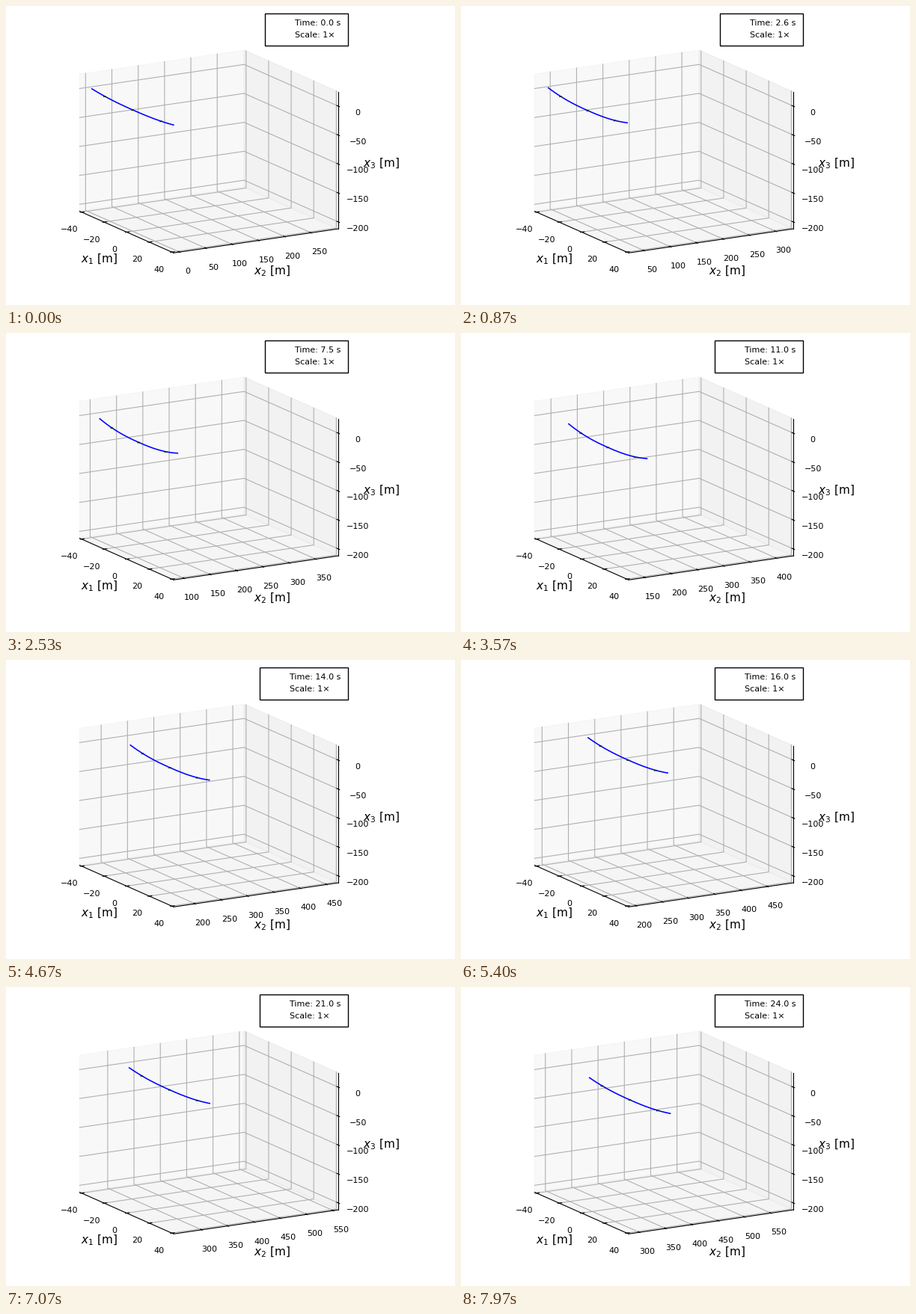
These frames come from a looping animation (600 by 400 pixels, 8 s). A matplotlib script:

```python
import numpy as np
import matplotlib.pyplot as plt
from matplotlib.animation import FuncAnimation
from matplotlib.patches import Polygon, Rectangle

W, H, DPI = 600, 400, 100
FRAMES, LOOP = 240, 8000
SPAN, SPEED, START = 300, 12.17, -5    # sliding x2 window

# Orthographic view: screen origin and one screen vector per box edge
ORIGIN = np.array([98.4, 274.6])
E1, E2, E3 = np.array([[125.6, 55.7], [219.9, -32.2], [0, -183.4]])

# Flight states: time, forward offset and rate, height and rate,
# half span, tip rise
KEYS = np.array([
    [0.0, 5.3, 0, -2.5, 0, 36.2, 5.2],
    [5.2, 8.4, 2.2, -7.4, -2, 34.2, 11.6],
    [7.6, 17.2, 6, -13.8, -4.2, 34.5, 11.0],
    [10.7, 43.5, 11, -25.7, -3, 34.7, 10.6],
    [14.0, 75.9, 7, -18.3, 8, 35.0, 8.7],
    [18.5, 78.3, -1, -1.9, 0, 35.5, 7.4],
    [23.9, 85.3, 9, -28.6, -8, 35.8, 7.4],
])
T = KEYS[:, 0]


def hermite(t, y, m):
    k = int(np.clip(np.searchsorted(T, t, side="right") - 1, 0, len(T) - 2))
    d = T[k + 1] - T[k]
    s = (t - T[k]) / d
    return ((2*s**3 - 3*s**2 + 1) * y[k] + (s**3 - 2*s**2 + s) * d * m[k]
            + (3*s**2 - 2*s**3) * y[k + 1] + (s**3 - s**2) * d * m[k + 1])


def box(u, v, w):
    """Screen points for box coordinates in 0..1."""
    u, v, w = np.broadcast_arrays(u, v, w)
    return ORIGIN + u[..., None] * E1 + v[..., None] * E2 + w[..., None] * E3


def f1(x):
    return (np.asarray(x) + 40 * 25 / 24) / (80 * 25 / 24)


def f2(d):
    return (np.asarray(d) + SPAN / 48) / (SPAN * 25 / 24)


def f3(z):
    return (np.asarray(z) + 212) / 236.8


fig = plt.figure(figsize=(W / DPI, H / DPI), dpi=DPI, facecolor="white")
ax = fig.add_axes([0, 0, 1, 1])
ax.set_xlim(0, W)
ax.set_ylim(H, 0)
ax.axis("off")


def line(pts=((0, 0), (0, 0)), color="black", lw=0.8, z=3, **kw):
    pts = np.asarray(pts)
    return ax.plot(pts[:, 0], pts[:, 1], color=color, lw=lw, zorder=z, **kw)[0]


def grid(pts=((0, 0), (0, 0))):
    return line(pts, "#b0b0b0", z=2, solid_joinstyle="round")


def label(x, y, s, size=8, ha="center"):
    return ax.text(x, y, s, fontsize=size, family="DejaVu Sans", ha=ha,
                   va="baseline", zorder=6)


def tick_ends(p, edge, inner, outer):
    d = edge / np.hypot(*edge)
    return np.array([p - inner * d, p + outer * d])


def number(v):
    return str(v).replace("-", "\u2212")


# Panes
for corners, tone in (
    (box(0, np.array([0, 1, 1, 0]), np.array([0, 0, 1, 1])), 0.95),
    (box(np.array([0, 1, 1, 0]), 1, np.array([0, 0, 1, 1])), 0.90),
    (box(np.array([0, 1, 1, 0]), np.array([0, 0, 1, 1]), 0), 0.925),
):
    ax.add_patch(Polygon(corners, fc=(tone,) * 3, ec=(tone,) * 3, alpha=0.5,
                         lw=1, zorder=1))

# Axis lines
line(box(np.array([0, 1]), 0, 0))
line(box(1, np.array([0, 1]), 0))
line(box(1, 1, np.array([0, 1])))

# Fixed x1 and x3 ticks
for v in range(-40, 41, 20):
    u = f1(v)
    grid(box(u, np.array([0, 1, 1]), np.array([0, 0, 1])))
    p = box(u, 0, 0)
    line(tick_ends(p, E2, 1.8, 3.6))
    label(p[0] - 16.5, p[1] + 26.5, number(v))

for v in range(-200, 1, 50):
    w = f3(v)
    grid(box(np.array([0, 0, 1]), np.array([0, 1, 1]), w))
    p = box(1, 1, w)
    line(tick_ends(p, E1, 2, 2))
    label(p[0] + 26.2, p[1] + 12, number(v))

for x, y, n in ((125, 343, 1), (356, 359.5, 2), (502, 215.5, 3)):
    label(x, y, f"$x_{n}$ [m]", 11)

# Sliding x2 ticks
slots = [(grid(), line(), label(0, 0, "")) for _ in range(7)]

# Legend
frame_box = ax.add_patch(Rectangle((346, 9.5), 110.5, 43.5, fc="white",
                                   ec="black", lw=1, zorder=5))
clock = label(386, 26.5, "", ha="left")
scale = label(386, 42.5, "Scale: 1\u00d7", ha="left")

# Wing with three pods
wing = line(color="blue", lw=1.15, z=4, solid_joinstyle="round")
pods = [line(color="#06351a", lw=1.1, z=4.1) for _ in range(3)]
STATIONS = np.linspace(-1, 1, 25)
POD_STATIONS = np.array([-0.69, 0, 0.69])


def wing_points(s, ahead, height, half, rise):
    return box(f1(s * half), f2(ahead),
               f3(height + rise * np.abs(s) ** 2.4))


def draw_ticks(t):
    low = START + SPEED * t
    first = int(np.ceil(low / 50)) * 50
    for k, (g, tick, text) in enumerate(slots):
        v = first + 50 * k
        shown = v <= low + SPAN
        for a in (g, tick, text):
            a.set_visible(shown)
        if not shown:
            continue
        pos = f2(v - low)
        g.set_data(*box(np.array([0, 0, 1]), pos, np.array([1, 0, 0])).T)
        p = box(1, pos, 0)
        tick.set_data(*tick_ends(p, E1, 2, 1).T)
        text.set_position((p[0] + 10.4, p[1] + 29))
        text.set_text(number(v))


def draw_wing(t):
    ahead = hermite(t, KEYS[:, 1], KEYS[:, 2])
    height = hermite(t, KEYS[:, 3], KEYS[:, 4])
    half, rise = (hermite(t, y, np.gradient(y, T)) for y in KEYS[:, 5:].T)
    wing.set_data(*wing_points(STATIONS, ahead, height, half, rise).T)
    for pod, p in zip(pods, wing_points(POD_STATIONS, ahead, height, half, rise)):
        pod.set_data(*tick_ends(p + (0, 0.3), E2, 1, 1).T)


def update(i):
    t = i / 10
    # two significant digits
    shown = t if t < 10 else float(round(t))
    left = 346 if t < 10 else 339
    frame_box.set_x(left)
    frame_box.set_width(456.5 - left)
    clock.set_x(left + 40)
    scale.set_x(left + 40)
    clock.set_text(f"Time: {shown:.1f} s")
    draw_ticks(t)
    draw_wing(t)
    return []


anim = FuncAnimation(fig, update, frames=FRAMES, interval=LOOP / FRAMES,
                     repeat=True, repeat_delay=0, blit=False)
plt.show()
```
